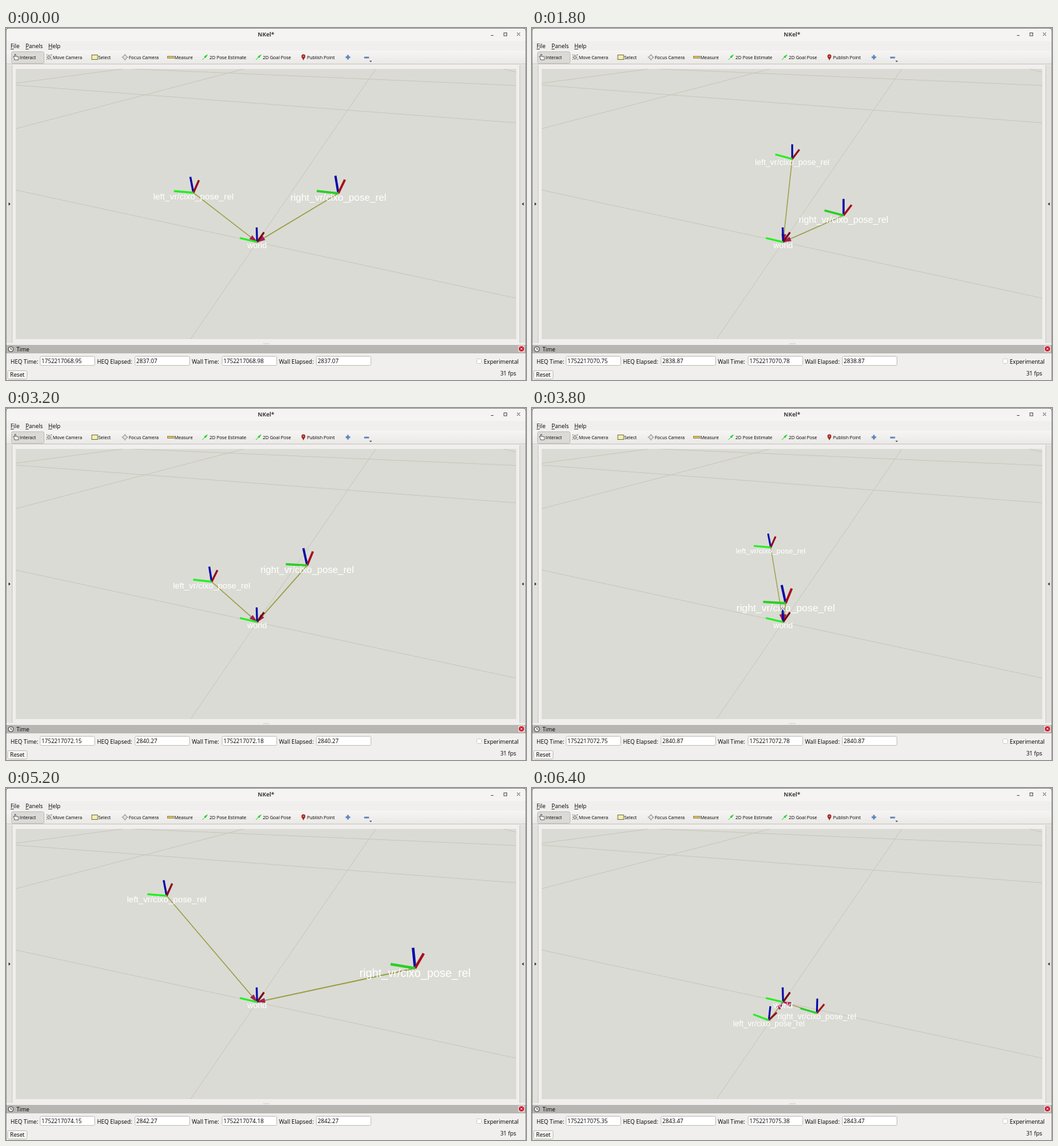
Animation of 800x542 px, one loop 6.5 s. Source, as an HTML page:

```html
<!DOCTYPE html>
<html lang="en">
<head>
<meta charset="utf-8">
<title>Pose viewer</title>
<style>
  html, body { margin: 0; width: 100%; height: 100%; overflow: hidden; background: #f0efed; }
  svg { display: block; width: 100vw; height: 100vh; }
  text { font-family: "Open Sans", "Noto Sans", sans-serif; font-size: 8.7px; fill: #000; }
  .tools text { font-size: 7px; }
  .grid { stroke: #c8c7ba; fill: none; }
  .label { font-family: "Liberation Sans", Arial, sans-serif; fill: #fff; text-anchor: middle; }
  .field { fill: #fff; stroke: #c3bfba; }
</style>
</head>
<body>
<svg viewBox="0 0 800 542">
  <defs>
    <linearGradient id="bar" x2="0" y2="1">
      <stop stop-color="#f6f5f4"/><stop offset="1" stop-color="#e9e8e5"/>
    </linearGradient>
    <clipPath id="view"><rect x="15" y="63" width="770" height="416"/></clipPath>
  </defs>

  <!-- window frame and menu -->
  <rect width="800" height="542" fill="#f0efed"/>
  <rect width="800" height="20" fill="#f5f4f2"/>
  <path d="M0 .5H800" stroke="#c9c7c4"/>
  <text x="400" y="13" text-anchor="middle" font-weight="bold" style="fill:#3d3d3d">NKel*</text>
  <g stroke="#555" fill="none">
    <path d="M746 11.5h4M786 7l5 5m0-5l-5 5"/><rect x="766" y="7.5" width="4.500" height="4.500"/>
  </g>
  <text x="7" y="30.500">File</text><text x="30" y="30.500">Panels</text><text x="65" y="30.500">Help</text>
  <path d="M7 32.500h5M30 32.500h5M65 32.500h6" stroke="#222" stroke-width=".8"/>

  <!-- toolbar -->
  <rect y="35" width="800" height="21" fill="url(#bar)"/>
  <path d="M0 55.500H800" stroke="#c8c5c1"/>
  <rect x="8.500" y="36.500" width="50" height="18" rx="2" fill="#dcdad7" stroke="#c2bfbb"/>
  <g class="tools">
    <path d="M13 49v-2l-2-3 1.500-.5 1 1V40.500h1.500V44h4v5z" fill="#fff" stroke="#444" stroke-width=".8"/>
    <path d="M66 41v8M62 45h8M64 42l-2-1M68 42l3-1M64 47l-2 2M68 47l3 2" stroke="#777" fill="none"/>
    <circle cx="66" cy="45" r="2" fill="#ddd" stroke="#666" stroke-width=".7"/>
    <rect x="132" y="41.500" width="9" height="7" fill="#f5efad" stroke="#77754a"/>
    <path d="M183 40v10M178 45h10" stroke="#888"/>
    <circle cx="183" cy="45" r="3" fill="#e2e2e2" stroke="#888" stroke-width=".8"/>
    <rect x="248.500" y="43.500" width="9.500" height="3" fill="#d9c36a" stroke="#8a783c" stroke-width=".8"/>
    <path id="goal" d="M302 49l4-4-1-1 5-3-3 5-1-1z" fill="#27d32d" stroke="#27d32d" stroke-width=".7"/>
    <use href="#goal" x="82.500"/>
    <path d="M457.500 50c-1-3-3-4-3-6.500a3 3 0 0 1 6 0c0 2.500-2 3.500-3 6.500z" fill="#a02820"/>
    <circle cx="457.500" cy="43.500" r="1" fill="#e8b0a8"/>
    <path d="M522.500 45h7M526 41.500v7M551 45.500h7.500" stroke="#5b83bd" stroke-width="2.600"/>
    <path d="M559 50.500h4l-2 2z" fill="#333"/>
    <text x="21" y="47.700">Interact</text><text x="72" y="47.700">Move Camera</text>
    <text x="142" y="47.700">Select</text><text x="189" y="47.700">Focus Camera</text>
    <text x="259" y="47.700">Measure</text><text x="313" y="47.700">2D Pose Estimate</text>
    <text x="395" y="47.700">2D Goal Pose</text><text x="463" y="47.700">Publish Point</text>
  </g>

  <!-- side handles and viewport -->
  <path d="M0 57h9v428H0zM791 57h9v428h-9z" fill="#e3e1de"/>
  <path d="M9.500 57v428M790.500 57v428" stroke="#cbc8c4"/>
  <path d="M4 268.500l3 2.500-3 2.500zM796.500 268.500l-3 2.500 3 2.500z" fill="#333"/>
  <path d="M396 486h9" stroke="#aaa" stroke-dasharray="1 1"/>
  <rect x="15" y="63" width="770" height="416" fill="#dbdbd5"/>
  <g clip-path="url(#view)">
    <path class="grid" d="M15 249.500L785 416M569 63L284 479M15 88L785 146M15 155L366 63M15 85L180 63M195 63L785 88.500M765 63L785 68"/>
    <g id="scene" transform="translate(.3 .6)"></g>
  </g>

  <!-- time panel -->
  <rect y="488" width="800" height="13" fill="#b8b6b2"/>
  <circle cx="7.500" cy="494.500" r="4" fill="#eee" stroke="#333"/>
  <path d="M7.500 492v2.800h2.300" fill="none" stroke="#333" stroke-width=".8"/>
  <text x="16" y="498">Time</text>
  <rect x="788" y="489" width="10" height="10" rx="2" fill="#e6dad8"/>
  <circle cx="793" cy="494" r="4" fill="#cf1c30"/>
  <path d="M791.500 492.500l3 3m0-3l-3 3" stroke="#fff" stroke-width=".8"/>
  <g id="fields"></g>
  <rect x="724.500" y="509.500" width="7" height="7" rx="1" fill="#fff" stroke="#d0cdc9"/>
  <text x="735" y="516.500">Experimental</text>
  <text x="785" y="535" text-anchor="end">31 fps</text>
  <rect x="2.500" y="527.500" width="30" height="13" rx="2" fill="#f5f4f2" stroke="#c3bfba"/>
  <text x="17.500" y="537" text-anchor="middle">Reset</text>
  <path d="M0 542V5Q0 0 5 0H795Q800 0 800 5V542" fill="none" stroke="#55505a"/>
</svg>

<script>
const LOOP = 6500, STEP = 100;

// Key points of each hand: time, screen position, apparent size, lean of the axes.
const leftPath = [
  { t: 0, x: 288, y: 253, size: 13.5, lean: .35 },
  { t: 1.8, x: 400, y: 201, size: 12.5, lean: 0 },
  { t: 2.7, x: 273, y: 291, size: 14, lean: .2 },
  { t: 3.8, x: 367, y: 214, size: 11.7, lean: .35 },
  { t: 4.6, x: 197, y: 164, size: 13.5, lean: .3 },
  { t: 5.8, x: 330, y: 201, size: 12.8, lean: .3 },
  { t: 6.4, x: 364, y: 357, size: 12, lean: -.2 }
];
const rightPath = [
  { t: 0, x: 511, y: 254, size: 15.1, lean: .3 },
  { t: 1.8, x: 479, y: 288, size: 14.1, lean: 0 },
  { t: 2.7, x: 542, y: 203, size: 14.4, lean: .35 },
  { t: 3.8, x: 390, y: 300, size: 15.5, lean: .4 },
  { t: 4.6, x: 644, y: 264, size: 18.5, lean: .35 },
  { t: 5.8, x: 555, y: 303, size: 15.5, lean: 0 },
  { t: 6.4, x: 438, y: 346, size: 12.4, lean: -.05 }
];
const WORLD = { x: 386, y: 329, size: 12.6, lean: 0.05 };

function set(node, attrs) {
  for (const name in attrs) node.setAttribute(name, attrs[name]);
}
function add(parent, tag, attrs, text = "") {
  const node = document.createElementNS("http://www.w3.org/2000/svg", tag);
  set(node, attrs);
  node.textContent = text;
  return parent.appendChild(node);
}

const scene = document.getElementById("scene");
const [arrows, axes, labels] = [0, 1, 2].map(() => add(scene, "g", {}));

function makeFrame(name, red, green) {
  return {
    shaft: add(arrows, "path", { stroke: "#9a9f48" }),
    head: add(arrows, "path", { fill: "#b01a58", stroke: "#7c123c", "stroke-width": .6 }),
    axes: ["#0508a6", red, green].map(stroke => add(axes, "path", { stroke })),
    label: add(labels, "text", { class: "label" }, name)
  };
}

// The axes scale with the label; leaning tips all three of them together.
function drawFrame(frame, { x, y, size, lean }) {
  const tips = [
    [-lean, -1.8],
    [.88 - .7 * lean, -1.15 - .8 * lean],
    [-2.08 - .4 * lean, -.55 + 1.05 * lean]
  ];
  frame.axes.forEach((axis, i) => set(axis, {
    d: `M${x} ${y}l${tips[i].map(v => v * size)}`, "stroke-width": size * .23
  }));
  set(frame.label, { x, y: y + size * .78, style: `font-size:${size}px` });
}

// Arrow from a tracked frame to the world origin.
function drawLink(frame, { x, y, size }) {
  const dx = x - WORLD.x, dy = y - WORLD.y, dist = Math.hypot(dx, dy) || 1;
  const ux = dx / dist, uy = dy / dist, length = 12, half = 3.3;
  const bx = WORLD.x + ux * length, by = WORLD.y + uy * length;
  set(frame.shaft, { d: `M${x} ${y}L${bx} ${by}`, "stroke-width": size * .11 });
  set(frame.head, {
    d: `M${WORLD.x} ${WORLD.y}L${bx - uy * half} ${by + ux * half}L${bx + uy * half} ${by - ux * half}z`
  });
}

drawFrame(makeFrame("world", "#700a14", "#20f020"), WORLD);
const hands = [
  [makeFrame("left_vr/cixo_pose_rel", "#900c18", "#20f020"), leftPath],
  [makeFrame("right_vr/cixo_pose_rel", "#a80e1a", "#28d024"), rightPath]
];

const fieldBox = document.getElementById("fields");
function makeField(name, x, boxX, start) {
  add(fieldBox, "text", { x, y: 516.5 }, name);
  add(fieldBox, "rect", { class: "field", x: boxX + .5, y: 505.5, width: 84, height: 14, rx: 2 });
  return { value: add(fieldBox, "text", { x: boxX + 2.5, y: 516 }), start };
}
const fields = [
  makeField("HEQ Time:", 7, 52, 1752217068.95),
  makeField("HEQ Elapsed:", 140, 198, 2837.07),
  makeField("Wall Time:", 286, 332, 1752217068.98),
  makeField("Wall Elapsed:", 420, 477, 2837.07)
];

// Velocity at a key point; the hands come to rest at the last one.
function velocity(path, i, prop) {
  const a = path[Math.max(i - 1, 0)], b = path[i + 1];
  return b ? (b[prop] - a[prop]) / (b.t - a.t) : 0;
}

// Cubic Hermite curve through the key points.
function poseAt(path, t) {
  const i = Math.max(path.findLastIndex((key, n) => key.t <= t && n < path.length - 1), 0);
  const a = path[i], b = path[i + 1], span = b.t - a.t;
  const u = (t - a.t) / span, v = 1 - u, pose = {};
  for (const prop of ["x", "y", "size", "lean"]) {
    pose[prop] = a[prop] * v * v * (1 + 2 * u) + b[prop] * u * u * (3 - 2 * u) +
      span * u * v * (v * velocity(path, i, prop) - u * velocity(path, i + 1, prop));
  }
  return pose;
}

function draw() {
  const t = Math.floor(performance.now() % LOOP / STEP) * STEP / 1000;
  for (const [frame, path] of hands) {
    const pose = poseAt(path, t);
    drawFrame(frame, pose);
    drawLink(frame, pose);
  }
  for (const { value, start } of fields) value.textContent = (start + t).toFixed(2);
  requestAnimationFrame(draw);
}
draw();
</script>
</body>
</html>
```
